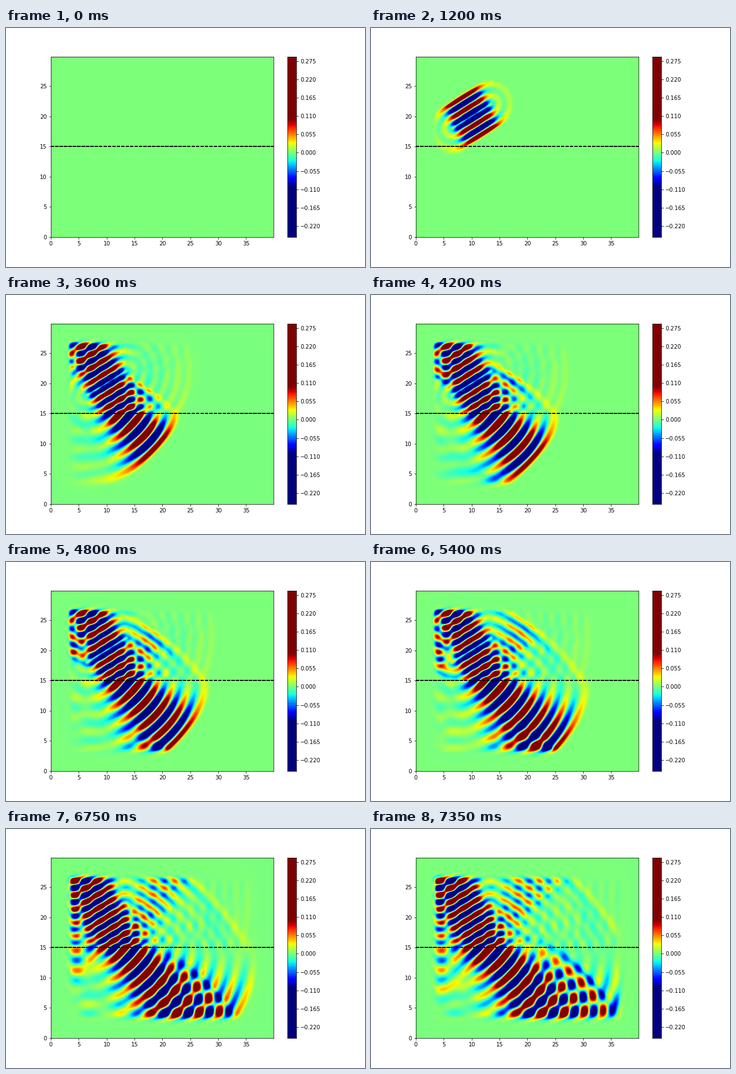
These frames come from a looping animation (648x432 px, 7500 ms). A matplotlib script:

```python
import numpy as np
import matplotlib.pyplot as plt
from matplotlib.animation import FuncAnimation
from matplotlib.colors import Normalize

FRAMES, INTERVAL = 50, 150
NX, NY, DX = 400, 300, 0.1
DT, STEPS = 0.05, 10            # ten solver steps per frame
C_TOP, C_BOTTOM, Y_FACE = 1.0, 1.4, 15.0
OMEGA, AMP = np.pi, 0.21

x = np.arange(NX) * DX
y = np.arange(NY) * DX


def line_source(cx=10.0, cy=20.0, half=4.2, width=2.6, tilt=np.radians(30)):
    """Tilted line of emitters with a bell-shaped strength, spread onto the grid."""
    s = np.linspace(-half, half, 169)
    power = np.exp(-s**2 / (2 * width**2))
    gx = (cx + s * np.cos(tilt)) / DX
    gy = (cy + s * np.sin(tilt)) / DX
    ix, iy = gx.astype(int), gy.astype(int)
    fx, fy = gx - ix, gy - iy
    src = np.zeros((NY, NX))
    for dx, wx in ((0, 1 - fx), (1, fx)):
        for dy, wy in ((0, 1 - fy), (1, fy)):
            np.add.at(src, (iy + dy, ix + dx), power * wx * wy)
    return src * 2 * AMP * OMEGA * C_TOP * (s[1] - s[0]) / DX**2


def edge_damping(start=3.6, ramp=0.5, peak=13.0):
    """Lossy frame around the domain; strong enough to reflect partly."""
    dist_x = np.minimum(x, x[-1] - x)
    dist_y = np.minimum(y, y[-1] - y)
    dist = np.minimum(dist_x[None, :], dist_y[:, None])
    return peak * np.clip((start - dist) / ramp, 0, 1)


def simulate():
    """Two-layer wave equation, leapfrog in time."""
    speed = np.where(y < Y_FACE - 1e-9, C_BOTTOM, C_TOP)[:, None]
    k = (speed * DT / DX) ** 2
    loss = edge_damping() * DT / 2
    gain = 1 / (1 + loss)
    src = line_source() * DT**2
    u = np.zeros((NY, NX))
    old = u.copy()
    lap = u.copy()
    shots = [u.astype(np.float32)]
    for n in range((FRAMES - 1) * STEPS):
        lap[1:-1, 1:-1] = (u[2:, 1:-1] + u[:-2, 1:-1] + u[1:-1, 2:]
                           + u[1:-1, :-2] - 4 * u[1:-1, 1:-1])
        drive = np.cos(OMEGA * n * DT) * (0.5 if n == 0 else 1.0)
        new = (2 * u - (1 - loss) * old + k * lap + drive * src) * gain
        old, u = u, new
        if (n + 1) % STEPS == 0:
            shots.append(u.astype(np.float32))
    return shots


shots = simulate()
norm = Normalize(-0.1, 0.1)

fig = plt.figure(figsize=(9, 6), dpi=72)
ax = fig.add_axes([0.125, 0.125, 0.62, 0.755])
h = DX / 2
field = ax.imshow(shots[0], cmap="jet", norm=norm, origin="lower",
                  aspect="auto", interpolation="bilinear",
                  extent=(-h, x[-1] + h, -h, y[-1] + h))
# Stacked copies harden the soft edges of the dashes
for _ in range(12):
    ax.plot([0, x[-1]], [Y_FACE, Y_FACE], "k--", lw=1.5)
ax.set_xlim(0, x[-1])
ax.set_ylim(0, y[-1])
ax.set_xticks(range(0, 40, 5))
ax.set_yticks(range(0, 30, 5))

# Colour scale in steps of 0.005
levels = np.arange(-51, 59) * 0.005
mids = (levels[:-1] + levels[1:]) / 2
cax = fig.add_axes([0.78375, 0.125, 0.755 * 432 / 20 / 648, 0.755])
cax.pcolormesh([0, 1], levels, mids[:, None], cmap="jet", norm=norm)
cax.set_xlim(0, 1)
cax.set_xticks([])
cax.yaxis.tick_right()
cax.set_yticks(np.arange(-4, 6) * 0.055)
cax.set_ylim(-0.2535, 0.2883)


def draw(i):
    field.set_data(shots[i])
    return (field,)


anim = FuncAnimation(fig, draw, frames=FRAMES, interval=INTERVAL,
                     repeat=True, repeat_delay=0, blit=False)
plt.show()
```
